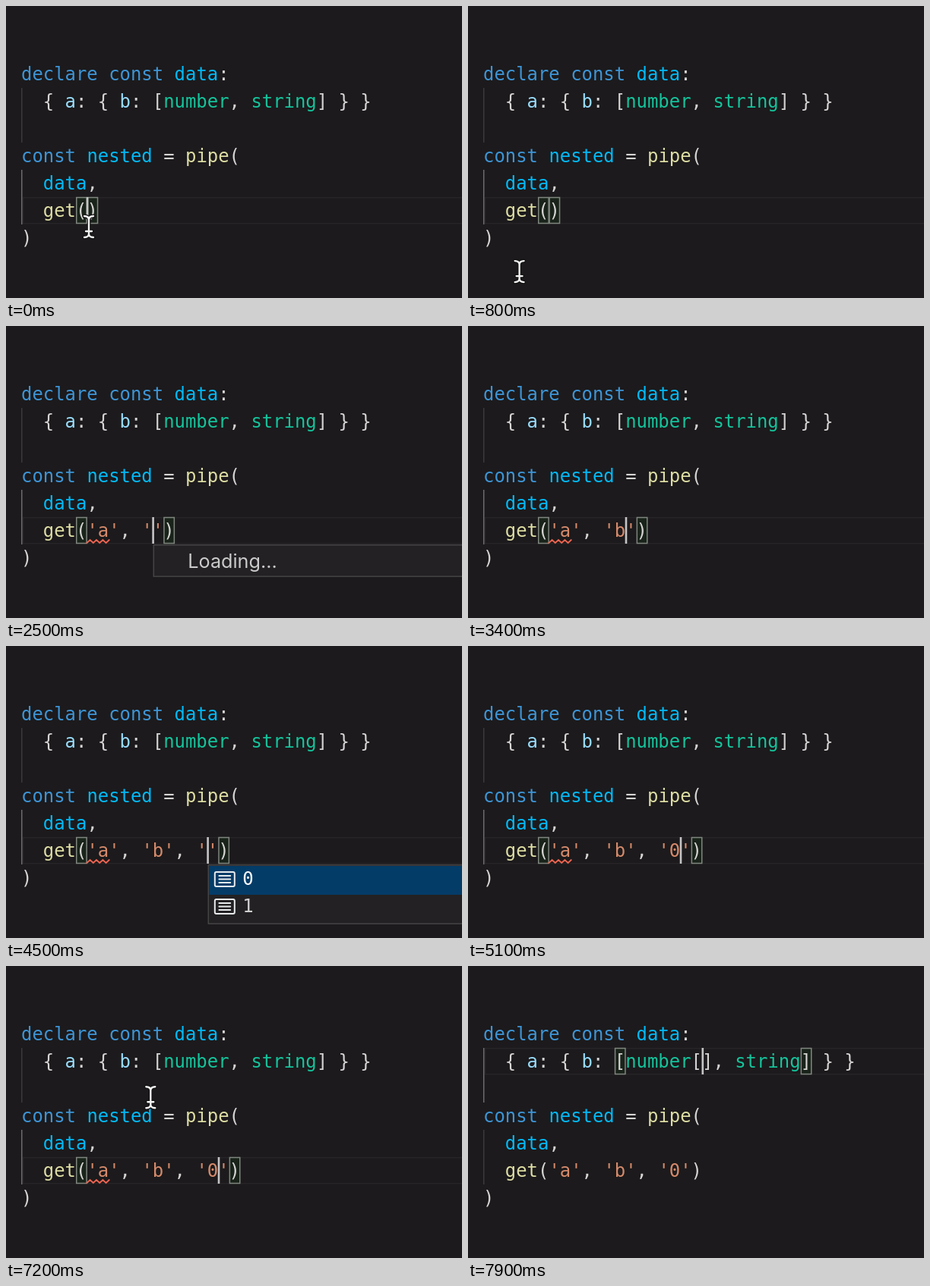
An HTML page for the animation above (8 s loop, 600 by 385 pixels).

```html
<!DOCTYPE html>
<html lang="en">
<head>
<meta charset="utf-8">
<title>Typed path completion</title>
<style>
  html, body { margin: 0; width: 100%; height: 100%; overflow: hidden; background: #1c1a1c; }
  svg { display: block; width: 600px; height: 385px; }
  text { font: 23.918px "DejaVu Sans Mono", monospace; white-space: pre; }
  text.ui { font: 25.2px Inter, sans-serif; }
</style>
</head>
<body>
<svg id="stage" viewBox="0 0 600 385"></svg>
<script>
const LOOP = 8000, TICK = 100;
const CW = 14.4, LEFT = 20, TOP = 72, LH = 36;
const C = {
  key: '#3d95d6', name: '#00baf8', prop: '#98dcfc', type: '#14c49c',
  fn: '#dddda4', str: '#d58a6b', txt: '#d6d5d4'
};
const CLICK = 7500, TYPE_BRACKETS = 7900;

// Arguments of get(); "|" is the caret
const TYPING = [
  [0, "|"], [900, "'|'"], [1700, "'a|'"], [1900, "'a'|"], [2100, "'a',|"],
  [2200, "'a', |"], [2300, "'a', '|'"], [3400, "'a', 'b|'"], [3700, "'a', 'b'|"],
  [3900, "'a', 'b',|"], [4000, "'a', 'b', |"], [4100, "'a', 'b', '|'"],
  [4900, "'a', 'b', '0|'"]
];
// from, to, items (none while loading)
const POPUPS = [
  [1000, 1200], [1200, 1700, 'a'], [2500, 2900], [2900, 3400, 'b'],
  [4200, 4500], [4500, 4900, '0', '1']
];
const CARET_OFF = [[400, 900], [1300, 1700], [2700, 3200], [4600, 4900], [5500, 6000], [6600, 7100]];
const MOUSE = [
  [0, 109, 291], [500, 98, 361], [900, 62, 348], [5500, 62, 348],
  [6300, 134, 200], [7000, 134, 200], [7500, 294, 124], [8000, 294, 124]
];

const within = (t, a, b) => t >= a && t < b;
const colX = col => LEFT + col * CW;
const rowY = row => TOP + row * LH;
const rect = (x, y, w, h, fill, stroke = 'none', sw = 1.5) =>
  `<rect x="${x}" y="${y}" width="${w}" height="${h}" fill="${fill}" stroke="${stroke}" stroke-width="${sw}"/>`;
const label = (x, y, s, fill, cls = '') =>
  `<text x="${x}" y="${y}" fill="${fill}" class="${cls}">${s}</text>`;
const stroke = (d, color, w) =>
  `<path d="${d}" fill="none" stroke="${color}" stroke-width="${w}" stroke-linecap="round"/>`;

// Lays out [text, colour] pairs on the character grid
function tokens(x, y, list) {
  let out = '';
  for (const [s, kind] of list) {
    if (s.trim()) out += label(x, y, s, C[kind]);
    x += s.length * CW;
  }
  return out;
}
const line = (row, ...list) => tokens(LEFT, rowY(row) + 26, list);

const guide = (row, active) => rect(20, rowY(row), 1.5, 2 * LH, active ? '#6c6b6c' : '#3b3a3b');
const bracket = (row, col) =>
  rect(colX(col) + .75, rowY(row) + .5, 13.4, 34, 'rgba(0,100,0,.12)', '#7f867f');

function mouseAt(t) {
  const i = MOUSE.findIndex((m, n) => t < MOUSE[n + 1][0]);
  const [a, x, y] = MOUSE[i], [b, x2, y2] = MOUSE[i + 1];
  const p = (t - a) / (b - a), e = p * p * (3 - 2 * p);
  return [x + (x2 - x) * e, y + (y2 - y) * e];
}

function mouse(t) {
  if (within(t, 900, 5500) || t >= TYPE_BRACKETS) return '';
  const d = 'M-6 -14Q0 -14 0 -9Q0 -14 6 -14M0 -9V9M-6 14Q0 14 0 9Q0 14 6 14M-4 6H4';
  return `<g transform="translate(${mouseAt(t)})">${stroke(d, '#151415', 5)}${stroke(d, '#f4f4f4', 2.3)}</g>`;
}

function popup(t, col) {
  const hit = POPUPS.find(p => within(t, p[0], p[1]));
  if (!hit) return '';
  const items = hit.slice(2), x = colX(col) + 1.5;
  const rows = Math.max(1, items.length);
  let out = rect(x, 288.7, 620 - x, 5.5 + 36 * rows, '#232123', '#454445');
  if (!items.length) return out + label(x + 45, 319, 'Loading...', '#cccbcc', 'ui');
  out += rect(x + 1, 290, 600 - x, 38, '#043c68');
  items.forEach((s, i) => {
    const y = 307 + 36 * i;
    out += `<rect x="${x + 8.5}" y="${y - 9}" width="26" height="19" rx="2" fill="none" stroke="#e8eaec" stroke-width="2"/>`
      + stroke([-4, .5, 5].map(d => `M${x + 14} ${y + d}h15`).join(''), '#e8eaec', 1.8)
      + label(x + 45, y + 8, s, i ? '#d0d0d0' : '#fff');
  });
  return out;
}

function tooltip(t) {
  if (!within(t, 6500, 7100)) return '';
  const o = Math.min(1, .5 + (t - 6500) / 600);
  return `<g opacity="${o}">` + rect(106.7, 128.7, 323, 54, '#1f1d1f', '#434243')
    + tokens(124, 164, [['const ', 'key'], ['nested', 'name'], [': ', 'txt'], ['number', 'type']]) + '</g>';
}

function squiggle() {
  let d = `M${colX(6)} 286`;
  for (let i = 0; i < 7; i++) d += `l4.2 ${i % 2 ? 4 : -4}`;
  return stroke(d, '#ee6450', 1.8);
}

function draw(t) {
  const edit = t >= CLICK, wide = t >= TYPE_BRACKETS;
  const raw = TYPING.filter(s => s[0] <= t).pop()[1];
  const args = raw.replace('|', '');
  const row = edit ? 1 : 5;
  const caret = edit ? (wide ? 20 : 19) : 6 + raw.indexOf('|');
  const pair = edit ? [12, wide ? 29 : 27] : [5, 6 + args.length];
  const argTokens = args.split(/('[^']*')/).map(s => [s, s[0] === "'" ? 'str' : 'txt']);

  let out = rect(0, 0, 600, 385, '#1c1a1c');
  out += rect(22.5, rowY(row) + .7, 600, LH - 2, 'none', '#272527');
  out += guide(1, edit) + guide(4, !edit);
  if (within(t, 6500, 7200)) out += rect(colX(6), rowY(3), 6 * CW, LH, '#15303f');
  out += pair.map(c => bracket(row, c)).join('');

  out += line(0, ['declare ', 'key'], ['const ', 'key'], ['data', 'name'], [':', 'txt']);
  out += line(1, ['  ', 'txt'], ['{ ', 'txt'], ['a', 'prop'], [': { ', 'txt'], ['b', 'prop'], [': [', 'txt'],
    ['number', 'type'], [wide ? '[], ' : ', ', 'txt'], ['string', 'type'], ['] } }', 'txt']);
  out += line(3, ['const ', 'key'], ['nested', 'name'], [' = ', 'txt'], ['pipe', 'fn'], ['(', 'txt']);
  out += line(4, ['  ', 'txt'], ['data', 'name'], [',', 'txt']);
  out += line(5, ['  ', 'txt'], ['get', 'fn'], ['(', 'txt'], ...argTokens, [')', 'txt']);
  out += line(6, [')', 'txt']);

  if (within(t, 1900, 7300)) out += squiggle();
  if (!CARET_OFF.some(([a, b]) => within(t, a, b)))
    out += rect(colX(caret) - .5, rowY(row), 2.6, LH - 1, '#c6c5c6');
  return out + popup(t, caret) + tooltip(t) + mouse(t);
}

const stage = document.getElementById('stage');
const start = performance.now();
let last = -1;
function frame() {
  const t = Math.floor((performance.now() - start) % LOOP / TICK) * TICK;
  if (t !== last) stage.innerHTML = draw(last = t);
  requestAnimationFrame(frame);
}
frame();
</script>
</body>
</html>
```
